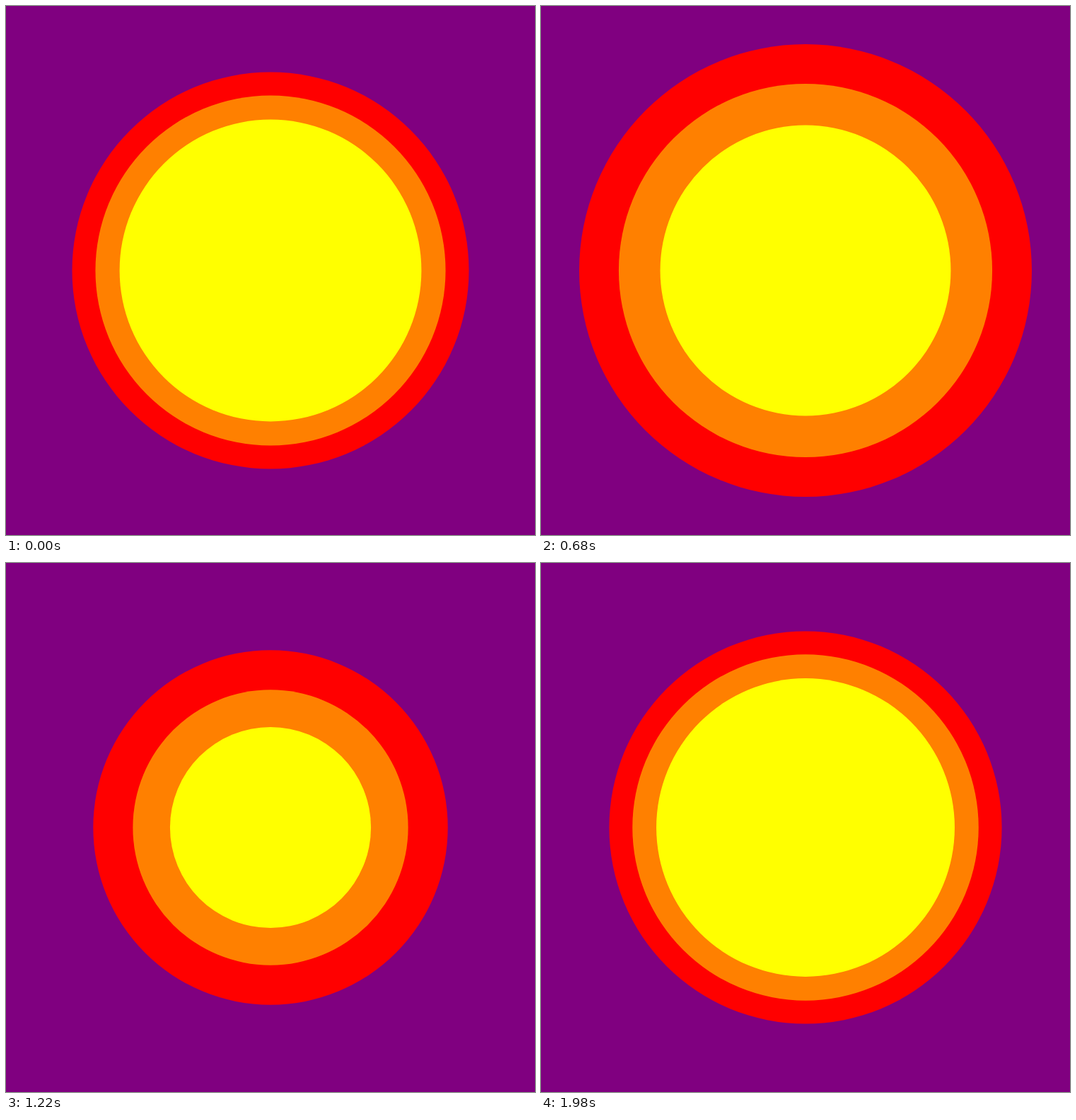
These frames come from a looping animation (748x748 px, 2 s). An HTML page without scripts:

```html
<!DOCTYPE html>
<html lang="en">
<head>
<meta charset="utf-8">
<title>Pulsing sun</title>
<style>
  @property --turn {
    syntax: "<angle>";
    inherits: true;
    initial-value: 0deg;
  }

  html, body {
    margin: 0;
    width: 100%;
    height: 100%;
    overflow: hidden;
    background: #800080;
  }

  svg {
    display: block;
    width: 100%;
    height: 100%;
    /* 50 poses a second; the 1ms lead keeps samples off the step edges */
    animation: turn 2s steps(100) -1ms infinite;
  }

  /* each disc swings around its mean radius, the inner ones ahead in phase */
  circle {
    r: calc(var(--mean) + 46.75px * sin(var(--turn) + var(--lead)));
  }

  .outer  { --mean: 280.5px;  --lead: 0rad;   fill: #ff0000; }
  .middle { --mean: 233.75px; --lead: 0.3rad; fill: #ff8000; }
  .inner  { --mean: 187px;    --lead: 0.6rad; fill: #ffff00; }

  @keyframes turn {
    from { --turn: 0deg; }
    to   { --turn: 360deg; }
  }
</style>
</head>
<body>
<svg viewBox="0 0 748 748">
  <circle class="outer" cx="374" cy="374"/>
  <circle class="middle" cx="374" cy="374"/>
  <circle class="inner" cx="374" cy="374"/>
</svg>
</body>
</html>
```
